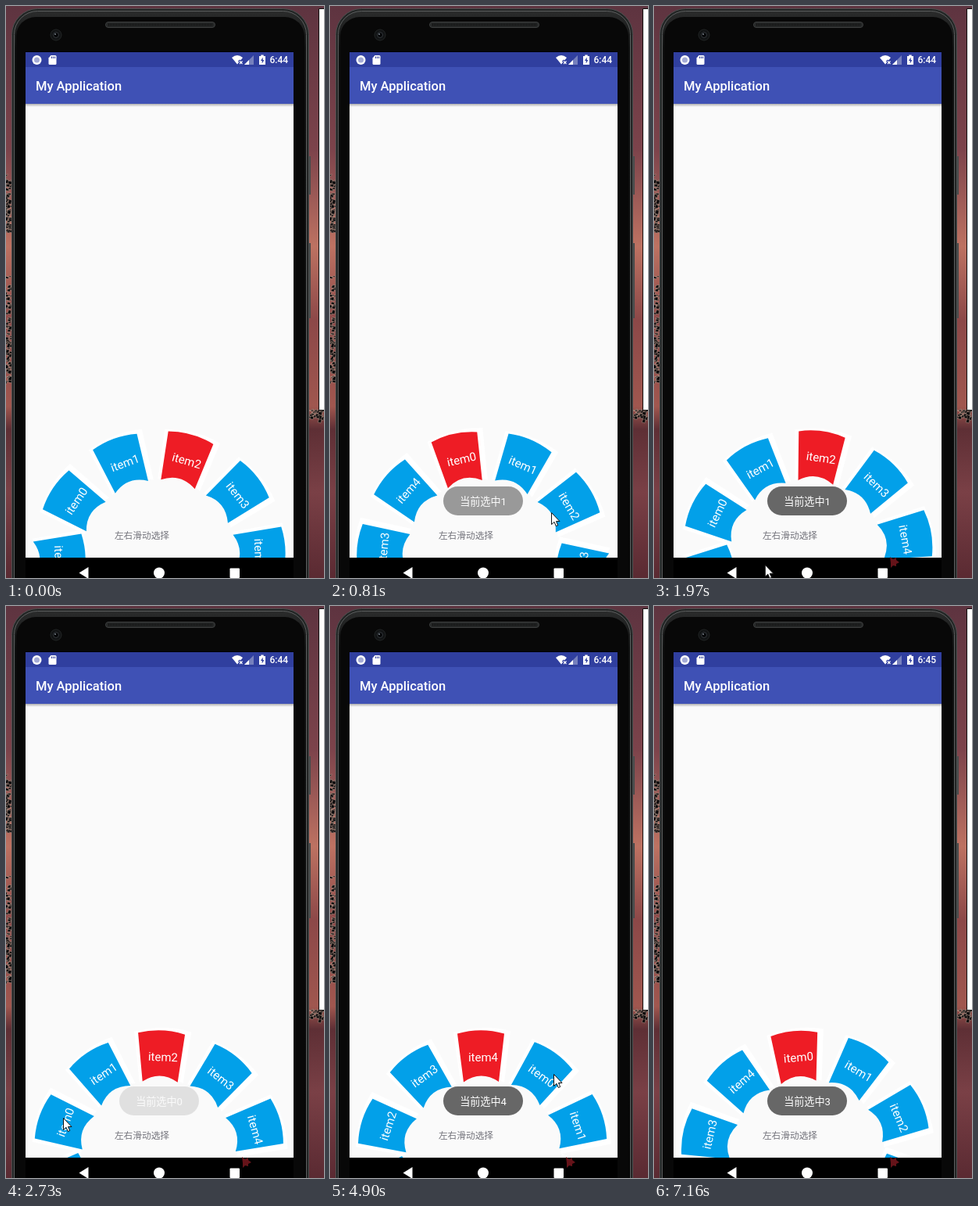
Write an HTML page that moves like this. It is 407x731 px and loops after 7860 ms.

```html
<!DOCTYPE html>
<html lang="zh-CN">
<head>
<meta charset="utf-8">
<title>Wheel menu</title>
<style>
  html, body { margin: 0; width: 100%; height: 100%; overflow: hidden; background: #5e3440; }
  svg { display: block; width: 407px; height: 731px; }
  text { font-family: Roboto, "Noto Sans CJK SC", "Noto Sans CJK", sans-serif; fill: #fff; }
  .mid { text-anchor: middle; }
  .label { font-size: 15px; }
  .title { font-size: 16.5px; font-weight: 500; }
  .clock { font-size: 12px; font-weight: 500; }
  .hint { font-size: 11.7px; fill: #74747c; }
  .toast { font-size: 13.1px; }
  .wedge { fill: #02a0e9; }
  .on .wedge { fill: #ee1c25; }
</style>
</head>
<body>
<svg viewBox="0 0 407 731" xmlns="http://www.w3.org/2000/svg">
  <defs>
    <linearGradient id="sky" x1="0" y1="0" x2="0" y2="1">
      <stop offset="0" stop-color="#5e3440"/>
      <stop offset=".25" stop-color="#7c434b"/>
      <stop offset=".42" stop-color="#bd7262"/>
      <stop offset=".55" stop-color="#8c4848"/>
      <stop offset=".7" stop-color="#a0574f"/>
      <stop offset=".74" stop-color="#5e2f35"/>
      <stop offset=".85" stop-color="#7a4046"/>
      <stop offset="1" stop-color="#5a2a32"/>
    </linearGradient>
    <linearGradient id="shade" x1="0" y1="0" x2="0" y2="1">
      <stop offset="0" stop-color="#000" stop-opacity=".3"/>
      <stop offset="1" stop-color="#000" stop-opacity="0"/>
    </linearGradient>
    <linearGradient id="gloss" x1="0" y1="0" x2="0" y2="1">
      <stop offset="0" stop-color="#2b2c2c"/>
      <stop offset=".06" stop-color="#101111"/>
      <stop offset="1" stop-color="#050505"/>
    </linearGradient>
    <clipPath id="screen"><rect x="25" y="59" width="343" height="646"/></clipPath>
  </defs>

  <rect width="407" height="731" fill="url(#sky)"/>
  <g id="trees" fill="#0b090b" stroke="#d9b8a8" stroke-width=".4"></g>
  <path d="M400.5 3.5H408V516.5H400.5Z" fill="#fff" stroke="#111"/>

  <!-- phone -->
  <path d="M387 192h3v49h-3zM387 303h3v96h-3z" fill="#4a4c4c"/>
  <rect x="7.5" y="3.5" width="380" height="790" rx="33" fill="#222424" stroke="#4d5050"/>
  <rect x="10.5" y="6.5" width="374" height="790" rx="30" fill="url(#gloss)" stroke="#5c5f5f"/>
  <rect x="13" y="14" width="369" height="790" rx="25" fill="#080808"/>
  <rect x="127.5" y="20.5" width="140" height="7" rx="3.5" fill="#252727" stroke="#3c3e3e"/>
  <path d="M131 24h133" stroke="#111" stroke-width="3" stroke-dasharray="1 1"/>
  <circle cx="64" cy="37" r="7" fill="#111314" stroke="#232626"/>
  <circle cx="64" cy="37" r="3.5" fill="#050608" stroke="#34383c"/>
  <circle cx="63" cy="36" r="1" fill="#788088"/>

  <rect x="25" y="58" width="343" height="673"/>
  <g clip-path="url(#screen)">
    <rect x="25" y="59" width="343" height="646" fill="#fafafa"/>
    <rect x="25" y="125" width="343" height="4" fill="url(#shade)"/>
    <rect x="25" y="78" width="343" height="47" fill="#3f51b5"/>
    <rect x="25" y="59" width="343" height="19" fill="#303f9f"/>
    <text class="title" x="38" y="108">My Application</text>

    <circle cx="39.500" cy="69" r="6" fill="#fff"/>
    <circle cx="39.500" cy="69" r="3.500" fill="#a5acd6"/>
    <path d="M57.500 63H63q1.500 0 1.500 1.500V73.500q0 1.500-1.500 1.500H56q-1.500 0-1.500-1.500V66.500Z" fill="#fff"/>
    <path d="M58.500 64.500v2.500M60.500 64.500v2.500M62.500 64.500v2.500" stroke="#303f9f"/>
    <path d="M289 66q7-6 14 0l-7 8.500z" fill="#fff"/>
    <path d="M298 69.500l5 5m0-5l-5 5" stroke="#303f9f" stroke-width="3"/>
    <path d="M299 70.500l3.500 3.500m0-3.500l-3.500 3.500" stroke="#fff" stroke-width="1.200"/>
    <path d="M317 63v12h-12z" fill="#7680bd"/>
    <path d="M311 69v6h-6z" fill="#fff"/>
    <path d="M324 64h2.300v-1.500h3.400V64H332v11h-8z" fill="#fff"/>
    <path d="M328.700 65.500l-2.700 4.500h1.700v3.500l2.700-4.500h-1.700z" fill="#303f9f"/>
    <text class="clock" id="clock" x="337.500" y="73.300"></text>

    <g id="wheel" transform="translate(196 704)"></g>
    <text class="hint mid" x="174" y="680.500">左右滑动选择</text>
    <g id="toast">
      <rect x="145" y="614" width="102" height="37" rx="18.500" fill="#676767"/>
      <text class="toast mid" id="pick" x="196" y="638"></text>
    </g>
  </g>

  <path d="M93.500 724.500l12-7.500v15z" fill="#fff"/>
  <circle cx="196" cy="724.500" r="7" fill="#fff"/>
  <rect x="286.500" y="718.500" width="12.500" height="12.500" rx="1" fill="#fff"/>
  <path id="stain" d="M302 704l4 3 4-2v3l4 3-4 2v3l-4-1-3 3v-6z" fill="#651319"/>
  <path id="cursor" d="M.5.5V15.500L4 12.300 6.300 17.500 8.700 16.500 6.500 11.500H11Z" fill="#fff" stroke="#111"/>
</svg>
<script>
const LOOP = 7860, STEP = 36, SLOTS = 10;
const $ = id => document.getElementById(id);
const ramp = (t, from, to) => Math.min(1, Math.max(0, (t - from) / (to - from)));
const show = (id, on) => $(id).setAttribute("visibility", on ? "visible" : "hidden");

// Free swings first, then whole-slot hops while the wheel is docked
function turnAt(t) {
  const swing = (from, to, deg) => deg * ramp(t, from, to);
  const hop = (from, to, n) => STEP * Math.round(n * ramp(t, from, to));
  return -56 + swing(70, 810, 43.5) + swing(880, 1190, 12.5)
    + swing(1280, 1740, -64) + swing(2340, 2880, -8)
    + hop(3000, 3100, -1) + hop(3570, 4550, 4) + hop(5130, 5830, -4)
    + swing(6375, 6930, 103);
}

// Pointer stops: arrival time, x, y; no trip takes longer than TRIP
const TRIP = 700;
const stops = [
  [110, 105, 640], [810, 283, 647], [1360, 302, 702], [1970, 142, 714], [2280, 73, 654],
  [3740, 173, 661], [4280, 343, 678], [4900, 286, 598], [5830, 91, 671],
  [6370, 225, 686], [7085, 363, 713]
];
function pointerAt(t) {
  const next = stops.findIndex(s => s[0] > t);
  if (next < 1) return stops.at(next).slice(1);
  const [t0, x0, y0] = stops[next - 1], [t1, x1, y1] = stops[next];
  const p = ramp(t, Math.max(t0, t1 - TRIP), t1);
  return [x0 + (x1 - x0) * p, y0 + (y1 - y0) * p];
}

// Toasts queue up: start time and picked item
const toasts = [[690, 1], [2700, 0], [4700, 4], [6960, 3]];
function drawToast(t) {
  const [start, item] = toasts.findLast(q => q[0] <= t) || [LOOP, 1];
  const age = t - start;
  $("toast").setAttribute("opacity", ramp(age, 0, 185) - ramp(age, 1800, 1950));
  $("pick").textContent = "当前选中" + item;
}

// Each slot is drawn around the hub, pointing up
$("wheel").innerHTML = Array.from({ length: SLOTS }, (_, i) => `
  <g>
    <path d="M-38-159Q0-170 35-161L27-95Q0-111-29-95Z" fill="#fff"/>
    <path class="wedge" d="M-33-157.500Q-3-166 27-157.500L20-96Q-3-111-25-95.500Z"/>
    <text class="label mid" y="-122.500">item${i % 5}</text>
  </g>`).join("");
const slots = [...$("wheel").children];

function drawWheel(turn) {
  slots.forEach((slot, i) => {
    const angle = i * STEP + turn;
    const up = Math.cos(angle * Math.PI / 180);
    // Below the hub's level a card is upside down
    const flip = up < 0 ? " rotate(180 0 -128)" : "";
    slot.setAttribute("transform", `rotate(${angle})${flip}`);
    slot.classList.toggle("on", up > Math.cos(Math.PI / SLOTS));
  });
}

// Foliage along both edges of the wallpaper
let seed = 7;
const rnd = () => (seed = seed * 16807 % 2147483647) / 2147483647;
function bush(n, x, y, w, h) {
  for (let i = 0; i < n; i++) {
    const d = `M${x + rnd() * w} ${y + rnd() * h}l${2 + rnd() * 3} ${rnd() * 4 - 2}l-1 ${2 + rnd() * 3}l-4-1z`;
    $("trees").insertAdjacentHTML("beforeend", `<path d="${d}"/>`);
  }
}
bush(60, -1, 216, 5, 70);
bush(80, -1, 345, 6, 135);
bush(24, 388, 516, 18, 11);

function draw(t) {
  drawWheel(turnAt(t));
  drawToast(t);
  $("clock").textContent = t < 6290 ? "6:44" : "6:45";
  $("cursor").setAttribute("transform", `translate(${pointerAt(t)})`);
  show("cursor", t > 140 && t < 7150);
  show("stain", t > 1430);
}

const start = performance.now();
function tick() {
  draw((performance.now() - start) % LOOP);
  requestAnimationFrame(tick);
}
tick();
</script>
</body>
</html>
```
